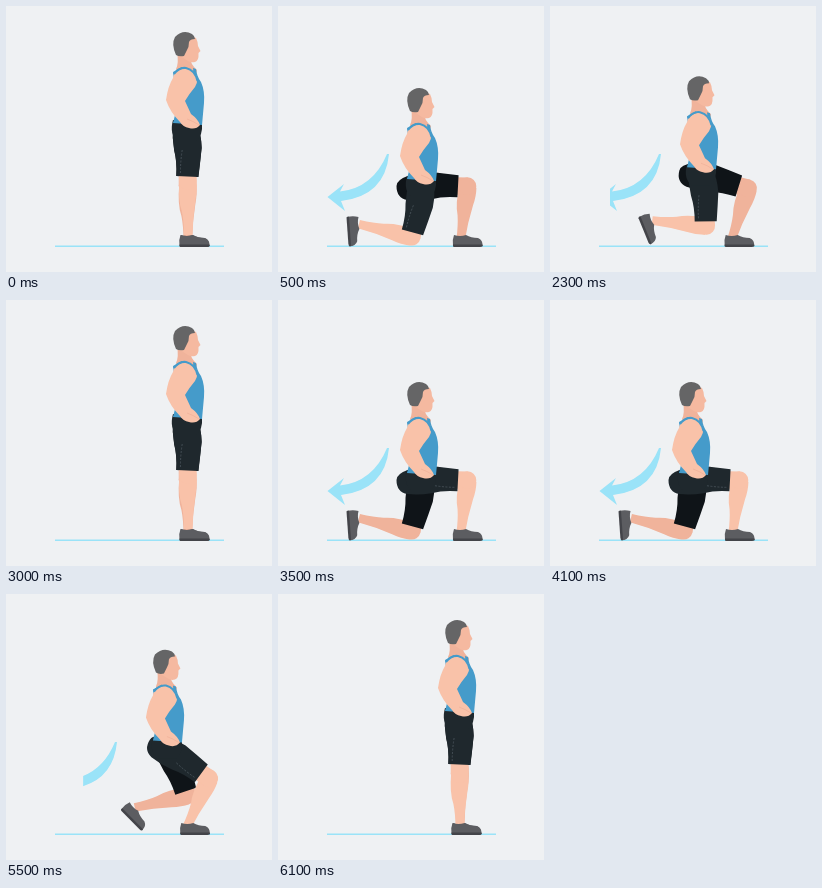
An HTML page with a canvas for the animation above (6.2 s loop, 266 by 266 pixels).

```html
<!DOCTYPE html>
<html lang="en">
<head>
<meta charset="utf-8">
<title>Reverse lunge</title>
<style>
  html, body { margin: 0; width: 100%; height: 100%; overflow: hidden; background: #eff1f3; }
  canvas { display: block; width: 100vw; height: 100vh; }
</style>
</head>
<body>
<canvas id="stage"></canvas>
<script>
const SIZE = 266, LOOP = 6200, REP = LOOP / 2, STEP = 100;
const BACKGROUND = '#eff1f3', BLUE = '#459bca', HAIR = '#656566', SHOE = '#5c5d61',
      SOLE = '#434449', ICE = '#9ae3f8';
const NEAR = { skin: '#f9c2a9', shorts: '#1f282d' };
const FAR = { skin: '#f0b39b', shorts: '#0f1418' };

const canvas = document.getElementById('stage');
const ctx = canvas.getContext('2d');

// Limb parts are drawn hanging straight down, facing right, from their joint.
const shape = {
  thigh: new Path2D('M0 -13Q-12 -13 -14 -2Q-15 10 -13 22Q-10 34 -11 48L11 49Q13 34 14.5 20Q14 4 10 -2Q6 -13 0 -13Z'),
  stripe: new Path2D('M-5 22Q-7 34 -7 46'),
  shin: new Path2D('M-8 -1Q-10 18 -6 30Q-4 40 -4 54L4.5 54Q5 36 8 18Q10 8 9 0Z'),
  shoe: new Path2D('M-7 0Q-1 2 5 0Q10 3 17 3Q22 5 21.5 11L-8 11Q-9 5 -7 0Z'),
  sole: new Path2D('M-8 9.5H21.5Q22.5 12 19 12H-7Q-8.5 12 -8 9.5Z'),
  pelvis: new Path2D('M167 114L196 117Q197 130 190 135L172 135Q163 129 167 114Z'),
  neck: new Path2D('M171 46L184 50Q184 58 191 64L189 74L173 72L170 63Q173 57 171 46Z'),
  face: new Path2D('M176 32Q183 28 190 32Q192 36 192 40L194.5 45L192.5 47Q193 55 189 56Q185 57 182 55L174 50Z'),
  hair: new Path2D('M170 49Q165 38 169 31Q177 23 186 28Q189 30 189 33Q184 33 183 36Q183 41 181 44L178 50Q173 51 170 49Z'),
  shirt: new Path2D('M167 66L176 61Q179 68 185 68Q188 67 187 62L190 63Q191 71 195 76Q199 85 198 97L196 119L167 117Q172 100 170 88Z'),
  arm: new Path2D('M170 66Q180 59 188 66Q194 73 189 81Q183 88 179 95L185 108Q192 113 194 119Q190 124 183 122Q177 121 174 116Q164 106 160 94Q162 80 167 72Q167 69 170 66Z'),
  strap: new Path2D('M168 68Q173 61 180 62Q189 64 191.5 75'),
  thumb: new Path2D('M181 113Q187 115 193 119'),
  arrow: new Path2D('M111 148Q107 190 63 195L67 205L49.5 191L66 178L62 185.5Q95 182 109 148Z')
};

const fill = (name, color) => { ctx.fillStyle = color; ctx.fill(shape[name]); };
function stroke(name, color, width) {
  ctx.strokeStyle = color;
  ctx.lineWidth = width;
  ctx.stroke(shape[name]);
}
function at(x, y, angle, draw) {
  ctx.save();
  ctx.translate(x, y);
  ctx.rotate(angle);
  draw();
  ctx.restore();
}
const mix = (a, b, p) => a + (b - a) * p;
const ease = u => (1 - Math.cos(Math.PI * Math.min(1, Math.max(0, u)))) / 2;
const lunge = t => t < 1500 ? ease(t / 400) : 1 - ease((t - 2130) / 560);

// Two-bone leg: the knee bends forward between hip and ankle.
function leg(hx, hy, ax, ay, thigh, shin, footAngle, side) {
  const dx = ax - hx, dy = ay - hy, d = Math.hypot(dx, dy);
  const along = (thigh ** 2 - shin ** 2 + d * d) / (2 * d);
  const out = Math.sqrt(Math.max(0, thigh ** 2 - along ** 2));
  const kx = hx + (dx * along + dy * out) / d;
  const ky = hy + (dy * along - dx * out) / d;
  const thighAngle = Math.atan2(hx - kx, ky - hy);

  at(kx, ky, Math.atan2(kx - ax, ay - ky), () => fill('shin', side.skin));
  at(kx, ky, thighAngle, () => {
    ctx.fillStyle = side.skin;
    ctx.fillRect(-8.5, -11, 17.5, 11);
    ctx.beginPath();
    ctx.arc(0.3, 0, 8.8, 0, 7);
    ctx.fill();
  });
  at(ax, ay, footAngle, () => {
    fill('shoe', SHOE);
    fill('sole', SOLE);
  });
  at(hx, hy, thighAngle, () => {
    fill('thigh', side.shorts);
    if (side === FAR) return;
    ctx.setLineDash([2, 1.5]);
    stroke('stripe', '#4b565d', 0.8);
  });
}

function upperBody(p) {
  at(-38 * p, 56 * p, 0, () => {
    fill('pelvis', NEAR.shorts);
    fill('neck', FAR.skin);
    fill('face', '#f5b9a0');
    fill('hair', HAIR);
    fill('shirt', BLUE);
    fill('arm', NEAR.skin);
    stroke('strap', BLUE, 2);
    stroke('thumb', FAR.skin, 0.8);
  });
}

function arrow(p) {
  ctx.save();
  ctx.beginPath();
  ctx.rect(mix(112, 46, p), 140, 70, 70);
  ctx.clip();
  fill('arrow', ICE);
  ctx.restore();
}

function render(now) {
  const time = Math.floor((now % LOOP) / STEP) * STEP;
  const p = lunge(time % REP);
  const hx = mix(181, 145, p), hy = mix(122, 179, p);
  const back = side => leg(hx, hy, mix(182, 81, p),
    mix(229, 218, p) - 10 * Math.sin(Math.PI * p), 53, 54, 1.5 * p, side);
  const front = side => leg(hx - 13.5 * p, hy + p, 181.5 + 1.5 * p, 229, 58, 49, 0, side);

  const dpr = window.devicePixelRatio || 1;
  const w = Math.round(innerWidth * dpr), h = Math.round(innerHeight * dpr);
  if (canvas.width !== w || canvas.height !== h) {
    canvas.width = w;
    canvas.height = h;
  }
  ctx.setTransform(w / SIZE, 0, 0, h / SIZE, 0, 0);
  ctx.fillStyle = BACKGROUND;
  ctx.fillRect(0, 0, SIZE, SIZE);
  ctx.fillStyle = ICE;
  ctx.fillRect(49, 239.5, 169, 1.5);

  if (p > 0.01) arrow(p);
  // The legs swap roles on the second repetition.
  if (time < REP) { front(FAR); back(NEAR); }
  else { back(FAR); front(NEAR); }
  upperBody(p);
}

function tick() {
  render(performance.now());
  requestAnimationFrame(tick);
}
tick();
</script>
</body>
</html>
```
